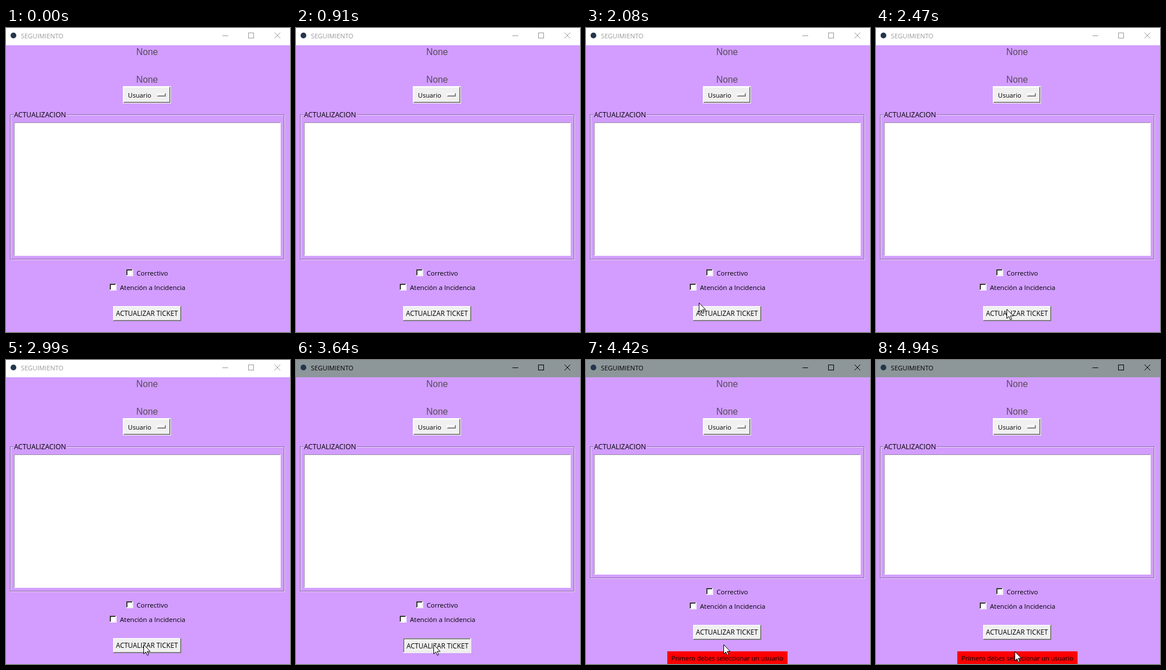
Animation, 496 px wide and 528 px high, one loop 5070 ms. Source, as an HTML page:

```html
<!DOCTYPE html>
<html lang="es">
<head>
<meta charset="utf-8">
<title>SEGUIMIENTO</title>
<style>
html, body { margin: 0; width: 496px; height: 528px; overflow: hidden; background: #d29dff; }
svg { display: block; }
text { font-family: "Open Sans", "Noto Sans", sans-serif; }
.big { font-family: "Liberation Sans", Arial, sans-serif; }
rect { shape-rendering: crispEdges; }
</style>
</head>
<body>
<svg id="stage" width="496" height="528"></svg>
<script>
const LOOP = 5070, STEP = 130;
const PRESS = 3640, RELEASE = 4160;
const stage = document.getElementById('stage');

// Pointer tip: time, x, y
const path = [
  [1690, -14, 440], [2080, 197, 477], [2600, 238, 492],
  [2860, 240, 494], [4550, 240, 494], [4940, 242, 506]
];

function pointer(t) {
  const i = path.findIndex(p => p[0] >= t);
  if (i < 1) return '';
  const [t0, x0, y0] = path[i - 1], [t1, x1, y1] = path[i];
  const k = (t - t0) / (t1 - t0);
  const x = Math.round(x0 + (x1 - x0) * k), y = Math.round(y0 + (y1 - y0) * k);
  return `<path transform="translate(${x + .5} ${y + .5})" fill="#fff" stroke="#000"
    d="M0 0V16L3.7 12.5L6.2 18.3L8.6 17.2L6.1 11.6H11.3Z"/>`;
}

const rect = (x, y, w, h, fill) =>
  `<rect x="${x}" y="${y}" width="${w}" height="${h}" fill="${fill}"/>`;

const text = (x, y, size, s, fill = '#000', extra = '') =>
  `<text x="${x}" y="${y}" font-size="${size}" fill="${fill}" ${extra}>${s}</text>`;

// One-pixel edges: one colour on the top left, another on the bottom right
const bevel = (x, y, w, h, topLeft, bottomRight, fill) =>
  rect(x, y, w, h, bottomRight) + rect(x, y, w - 1, h - 1, topLeft) +
  rect(x + 1, y + 1, w - 2, h - 2, fill);

const raised = (x, y, w, h) =>
  bevel(x, y, w, h, '#fff', '#696969', '#f0f0f0') +
  bevel(x + 1, y + 1, w - 2, h - 2, '#f4f4f4', '#a0a0a0', '#f0f0f0');

const sunken = (x, y, w, h, fill, outer = '#a0a0a0', inner = '#696969') =>
  bevel(x, y, w, h, outer, '#fff', fill) +
  bevel(x + 1, y + 1, w - 2, h - 2, inner, '#e3e3e3', fill);

const outline = (x, y, w, h, color) =>
  `<rect x="${x + .5}" y="${y + .5}" width="${w}" height="${h}" fill="none" stroke="${color}"/>`;

function titleBar(active) {
  const ink = active ? '#000' : '#999';
  return rect(0, 0, 496, 30, active ? '#8d9699' : '#fff') +
    '<circle cx="13" cy="13" r="5" fill="#24364c"/>' +
    text(26, 18, 11.2, 'SEGUIMIENTO', ink) +
    rect(378, 13, 10, 1, ink) + outline(423, 8, 9, 9, ink) +
    `<path d="M469 8l10 10m0-10l-10 10" stroke="${ink}"/>`;
}

const checkbox = (x, y, size, label) =>
  sunken(x, y, 12, 12, '#fff', '#696969', '#000') + text(x + 18, y + 11, size, label);

function scene(t) {
  const active = t >= PRESS, error = t >= RELEASE;
  const pressed = active && !error;
  const lift = error ? 23 : 0, push = pressed ? 1 : 0;
  const none = y => text(246.5, y, 15.8, 'None', '#554c58', 'class="big" text-anchor="middle"');

  return rect(0, 0, 496, 528, '#d29dff') + titleBar(active) + none(47) + none(95) +
    rect(204, 101, 84, 30, '#fff') + raised(205, 102, 82, 28) +
    text(213, 121, 11.2, 'Usuario') + raised(264, 113, 15, 6) +
    outline(8, 151, 478, 251 - lift, '#f0dcff') + outline(7, 150, 478, 251 - lift, '#8c62ad') +
    rect(13, 149, 93, 4, '#d29dff') + text(14, 155, 12, 'ACTUALIZACION') +
    bevel(14, 164, 466, 232 - lift, '#9a8ca6', '#f0e4fa', '#fff') +
    checkbox(210, 419 - lift, 11.5, 'Correctivo') +
    checkbox(181, 444 - lift, 11.55, 'Atención a Incidencia') +
    (pressed ? sunken : raised)(187, 483 - lift, 119, 26, '#f0f0f0') +
    text(192 + push, 500 - lift + push, 11.75, 'ACTUALIZAR TICKET') +
    (error ? rect(142, 506, 210, 22, '#f00') +
      text(247, 522, 11.1, 'Primero debes seleccionar un usuario', '#000', 'text-anchor="middle"') : '') +
    pointer(t);
}

let shown = -1;
function tick() {
  const t = Math.floor(performance.now() % LOOP / STEP) * STEP;
  if (t !== shown) stage.innerHTML = scene(shown = t);
  requestAnimationFrame(tick);
}
tick();
</script>
</body>
</html>
```
